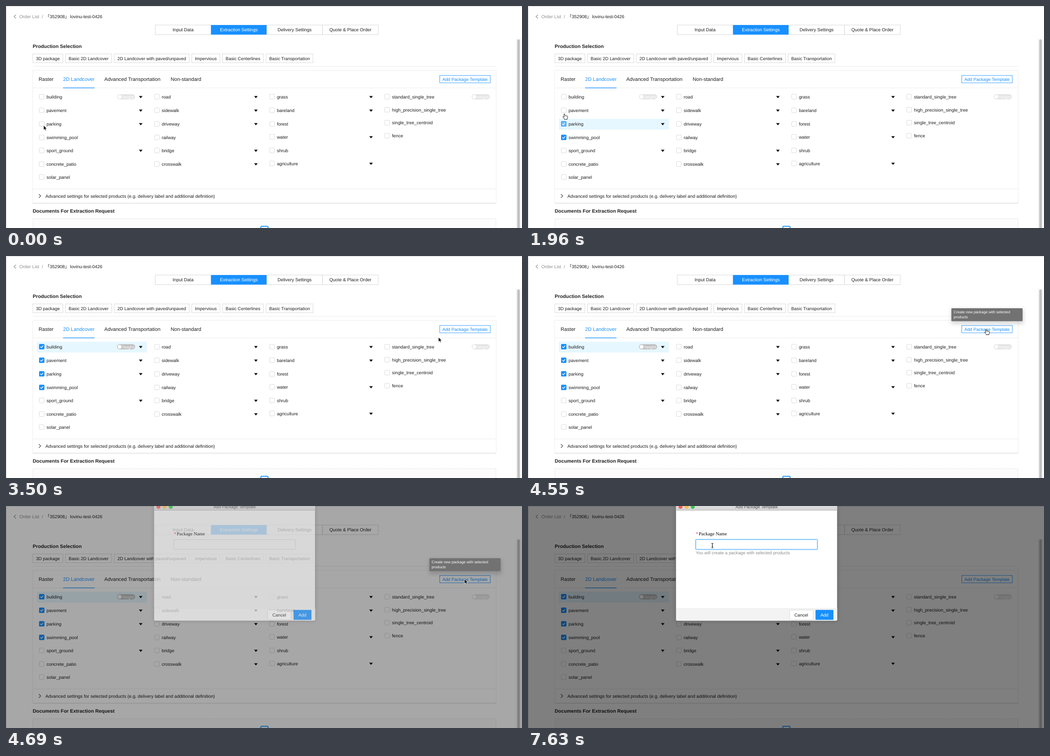
An HTML page for the animation above (8 s loop, 1139 by 492 pixels).

```html
<!DOCTYPE html>
<html lang="en">
<head>
<meta charset="utf-8">
<title>Extraction settings</title>
<style>
html, body { margin: 0; width: 100%; height: 100%; overflow: hidden; background: #fff; }
svg { display: block; width: 1139px; height: 492px; }
text { font: 10px "Liberation Sans", "Noto Sans CJK SC", "Noto Sans CJK JP", "Noto Sans CJK", sans-serif; fill: #1f1f1f; text-rendering: geometricPrecision; }
.mid { text-anchor: middle; }
.head { font-size: 10.8px; font-weight: bold; }
.tab { font-size: 11.15px; }
.pack { font-size: 9.83px; }
.blue { fill: #1890ff; }
.grey { fill: #8c8c8c; }
.white { fill: #fff; }
.line { fill: none; stroke: #d4d4d4; stroke-width: .9; }
.soft { fill: none; stroke: #ececec; }
.hot { stroke: #1890ff; }
.tip { font-size: 8.2px; fill: #fff; }
.small { font-size: 9.7px; }
.label { font: 10.4px "Liberation Serif", serif; fill: #000; }
.chevron { fill: none; stroke: #444; stroke-width: 1.1; }
</style>
</head>
<body>
<svg viewBox="0 0 1139 492">
  <defs>
    <linearGradient id="bar" x2="0" y2="1"><stop stop-color="#e6e6e6"/><stop offset="1" stop-color="#d4d4d4"/></linearGradient>
    <filter id="blur" x="-20%" y="-40%" width="140%" height="180%"><feGaussianBlur stdDeviation="4"/></filter>
  </defs>

  <g id="page">
    <rect width="1139" height="492" fill="#fff"/>
    <path d="M.5 492V3Q.5.5 3 .5H1139" fill="none" stroke="#cfcfcf"/>
    <path class="chevron" d="M22 19.5L17.5 23.5L22 27.5" style="stroke:#8c8c8c"/>
    <text class="grey" x="29.5" y="27">Order List</text>
    <text class="grey" x="79" y="27">/</text>
    <text x="86.5" y="27">「352908」</text>
    <text x="141.5" y="27">lovinu-test-0426</text>
    <g id="steps"></g>
    <text class="head" x="59" y="93">Production Selection</text>
    <g id="packs"></g>
    <path class="soft" d="M59 133.5H1082"/>
    <rect class="soft" x="59" y="142.5" width="1023" height="294.5" rx="1"/>
    <path class="line" d="M59 437H1082"/>
    <path class="soft" d="M59 181.5H1082M59 405.5H1082"/>
    <text class="tab" x="72" y="166.3">Raster</text>
    <text class="tab blue" x="126" y="166.3">2D Landcover</text>
    <text class="tab" x="217" y="166.3">Advanced Transportation</text>
    <text class="tab" x="363.5" y="166.3">Non-standard</text>
    <rect class="blue" x="126" y="180.8" width="69.3" height="1.4"/>
    <rect class="line hot" x="957.4" y="154" width="111.6" height="16.2"/>
    <text class="blue mid" x="1013.2" y="165.8" style="font-size:9.75px">Add Package Template</text>
    <g id="rows"></g>
    <path class="chevron" d="M72.5 417L76.8 421L72.5 425"/>
    <text x="87" y="424.7" style="font-size:10.05px">Advanced settings for selected products (e.g. delivery label and additional definition)</text>
    <text class="head" x="59" y="458.3">Documents For Extraction Request</text>
    <rect x="59.5" y="471.5" width="1022" height="30" fill="#fcfcfc" stroke="#d9d9d9" stroke-dasharray="2 2"/>
    <path d="M561 494L563.5 488.3H577.5L580 494" fill="none" stroke="#40a9ff" stroke-width="2.4"/>
    <rect x="1126.5" y="72" width="12.5" height="420" fill="#fafafa"/>
    <path class="soft" d="M1126.5 72V492"/>
    <rect x="1128.5" y="74" width="5.8" height="430" rx="2.9" fill="#c1c1c1"/>
  </g>

  <rect id="mask" width="1139" height="492" opacity="0"/>

  <g id="tooltip" opacity="0">
    <rect x="934" y="118" width="160" height="33" fill-opacity=".14" filter="url(#blur)"/>
    <rect x="934.5" y="115.7" width="157.3" height="28.8" rx="1.5" fill="#727272"/>
    <text class="tip" x="939.5" y="127">Create new package with selected</text>
    <text class="tip" x="939.5" y="138.3">products</text>
  </g>

  <g id="dialog" opacity="0">
    <rect x="326" y="-10" width="357" height="265" rx="4" fill-opacity=".2" filter="url(#blur)"/>
    <rect id="sheet" x="326.5" y="-10" width="356" height="264.5" rx="3.5" fill="#fff" stroke="#8a8a8a" stroke-width=".7"/>
    <path d="M327 227H682.5V251Q682.5 254 679.5 254H330Q327 254 327 251Z" fill="#f3f3f3"/>
    <path class="soft" d="M327 226.8H682.5"/>
    <rect x="326.8" y="-10" width="355.6" height="19.5" fill="url(#bar)"/>
    <path d="M327 9.5H682.5" stroke="#b4b4b4"/>
    <g id="lights"></g>
    <text class="mid" x="504.7" y="5" style="font-size:9.1px;fill:#4a4a4a">Add Package Template</text>
    <text class="label" x="370.5" y="65.2" style="fill:#f5222d">*</text>
    <text class="label" x="377" y="65">Package Name</text>
    <rect id="glow" x="369.5" y="73.5" width="270" height="23.5" rx="2" fill="none" stroke="#1890ff" stroke-opacity=".22" stroke-width="2" opacity="0"/>
    <rect id="field" x="370.5" y="74.5" width="268" height="21.5" rx="1" fill="none" stroke="#d0d0d0"/>
    <rect id="caret" x="378" y="79" width="1" height="12" opacity="0"/>
    <text id="hint" class="grey small" x="370.3" y="107.3">You will create a package with selected products</text>
    <rect x="577.5" y="230.5" width="52" height="21.5" rx="1" fill="#fff" stroke="#d9d9d9"/>
    <text class="mid small" x="603.2" y="244.6">Cancel</text>
    <rect class="blue" x="634.7" y="230.2" width="39.5" height="22" rx="1"/>
    <text class="mid white" x="654.3" y="244.6">Add</text>
  </g>

  <g id="cursor">
    <path id="arrow" d="M0 0V10.3L2.4 8.1L4 11.7L5.8 10.9L4.2 7.4H7.4Z" fill="#000" stroke="#fff" stroke-width=".8"/>
    <path id="hand" d="M-2 1.2Q-1.1-.4 0 1L1.2 4.6Q2.2 3.6 3.1 4.8Q4.2 3.9 4.9 5.1Q6.4 4.7 6.5 6.4Q6.9 9 5.4 11V12.5H-.7V11.2L-3.9 7.7Q-4.3 6.3-2.8 6.4L-.9 7.3Z" fill="#fff" stroke="#000" stroke-width=".9" stroke-linejoin="round"/>
    <path id="beam" d="M-2.3-4.8Q0-4.8 0-3.6Q0-4.8 2.3-4.8M0-3.8V4.2M-2.3 5.2Q0 5.2 0 4Q0 5.2 2.3 5.2M-1.2 1.7H1.2" fill="none" stroke="#000" stroke-width="1.1"/>
  </g>
</svg>
<script>
const LOOP = 8000;
const byId = id => document.getElementById(id);
const put = (id, html) => byId(id).innerHTML += html;
const rect = (x, y, w, h, attrs) => `<rect x="${x}" y="${y}" width="${w}" height="${h}" ${attrs}/>`;
const text = (x, y, s, cls = '') => `<text x="${x}" y="${y}" class="${cls}">${s}</text>`;

['Input Data', 'Extraction Settings', 'Delivery Settings', 'Quote &amp; Place Order'].forEach((s, i) => {
  const x = 329.4 + i * 123.1, on = i === 1;
  put('steps', rect(x, 42.1, 123.1, 21.4, `class="${on ? 'blue' : 'line'}"`) +
    text(x + 61.5, 56.4, s, on ? 'mid white' : 'mid'));
});

// Package buttons flow left to right, sized by their text
let left = 59.2;
['3D package', 'Basic 2D Landcover', '2D Landcover with paved/unpaved',
 'Impervious', 'Basic Centerlines', 'Basic Transportation'].forEach(s => {
  put('packs', text(left + 7, 119.6, s, 'pack'));
  const w = byId('packs').lastChild.getComputedTextLength() + 14;
  put('packs', rect(left, 106.2, w, 19.5, 'class="line"'));
  left += w + 5.7;
});

['#fc5753', '#fdbc40', '#33c748'].forEach((c, i) =>
  put('lights', `<circle cx="${336.6 + i * 13.5}" cy="1.8" r="4.4" fill="${c}"/>`));

// Products: "v" has a dropdown, "h" a height switch
const columns = [
  'building:vh pavement:v parking:v swimming_pool sport_ground:v concrete_patio solar_panel',
  'road:v sidewalk:v driveway:v railway bridge:v crosswalk:v',
  'grass:v bareland:v forest water:v shrub agriculture:v',
  'standard_single_tree:h high_precision_single_tree single_tree_centroid fence'
];
// Product, hover time, click time
const picks = [
  ['swimming_pool', 280, 1190], ['parking', 1330, 1750], ['pavement', 2030, 2310], ['building', 2380, 3080]
];
const rowY = {};

const pill = (x, y, id) => rect(x, y - 5.7, 40, 11.4, `rx="5.7" fill="#e4e4e4" id="${id}"`) +
  `<circle cx="${x + 5.8}" cy="${y}" r="4.3" fill="#fff"/>
   <text x="${x + 12}" y="${y + 3.3}" class="white" style="font-size:9.4px">height</text>`;

columns.forEach((list, c) => {
  const x = 73 + c * 254.2;
  let y = 201.2;
  list.split(' ').forEach(item => {
    const [name, flags = ''] = item.split(':');
    const drop = flags.includes('v'), h = drop ? 24 : 22.6, pick = picks.some(p => p[0] === name);
    const box = attrs => rect(x + .5, y - 5.5, 10.6, 10.6, `rx="1" ${attrs}`);
    let s = pick ? rect(68, y + .6 - h / 2, 243, h, `id="${name}-row" fill="none"`) : '';
    s += box('fill="#fff" stroke="#d9d9d9"');
    if (pick) s += box(`id="${name}-edge" fill="none" stroke="#1890ff" opacity="0"`) +
      `<g id="${name}-check" opacity="0">${box('class="blue" stroke="#1890ff"')}
       <path d="M${x + 2.8} ${y - .3}l2.3 2.4l4-4.6" fill="none" stroke="#fff" stroke-width="1.4"/></g>`;
    s += text(x + 16.5, y + 3.6, name);
    if (drop) s += `<path d="M${x + 220.4} ${y - 1.8}h8l-4 5z" fill="#111"/>`;
    if (flags.includes('h')) s += pill(drop ? 245 : 1028, y, name + '-pill');
    put('rows', s);
    rowY[name] = y;
    y += drop ? 30.1 : 28.8;
  });
});

// Motion: [ms, value] pairs become CSS keyframes
const motion = document.createElement('style');
document.head.append(motion);
function move(id, prop, keys, ease = 'linear') {
  const all = [[0, keys[0][1]], ...keys, [LOOP, keys.at(-1)[1]]];
  const name = `${id}-${prop}`;
  motion.textContent += `@keyframes ${name} {` +
    all.map(([ms, v]) => `${ms / LOOP * 100}% { ${prop}: ${v} }`).join(' ') +
    `}\n#${id} { animation: ${name} ${LOOP}ms ${ease} infinite }\n`;
}
const fade = (id, start, length, ease, prop = 'opacity', from = 0, to = 1) =>
  move(id, prop, [[start, from], [start + length, to]], ease);
// Shows a part in hard on/off spans: switch times, starting with "on"
const flash = (id, ...times) =>
  move(id, 'opacity', [[0, 0], ...times.map((ms, i) => [ms, (i + 1) % 2])], 'step-end');

const NONE = 'rgba(225,225,225,0)', HOVER = 'rgb(225,225,225)', CHOSEN = 'rgb(230,247,255)';
const stops = [{ from: 0, to: 0, x: 83, y: 264.5 }];
picks.forEach(([name, hover, click], i) => {
  const fill = [[hover, NONE], [hover + 140, HOVER], [click, HOVER], [click + 70, CHOSEN]];
  const next = picks[i + 1];
  if (next) fill.push([next[2], CHOSEN], [next[2] + 70, NONE]);
  move(name + '-row', 'fill', fill);
  fade(name + '-edge', hover, 140);
  fade(name + '-check', click, 280, 'ease-in');
  stops.push({ from: hover + 140, to: click, x: 81, y: rowY[name] - 7.5 });
});
fade('building-pill', 3080, 140, 'linear', 'fill', '#e4e4e4', '#bfbfbf');

stops.push(
  { from: 3640, to: 3780, x: 1082, y: 178 },
  { from: 4340, to: 4690, x: 1012, y: 162 },
  { from: 5250, to: 5320, x: 328, y: 34 },
  { from: 5530, to: 5670, x: 402.5, y: 69.5 },
  { from: 6300, to: LOOP, x: 407, y: 87.5 }
);
const at = p => `translate(${p.x}px, ${p.y}px)`;
move('cursor', 'transform', stops.flatMap(p => [[p.from, at(p)], [p.to, at(p)]]), 'ease-in-out');
flash('arrow', 0, 140, 3220, 4270, 4620, 5880);
flash('hand', 140, 3220, 4270, 4620);
flash('beam', 5880);

move('tooltip', 'opacity', [[4270, 0], [4480, 1], [4760, 1], [4970, 0]]);
fade('mask', 4550, 350, 'ease', 'opacity', 0, .5);
fade('dialog', 4550, 350, 'ease');
fade('sheet', 4690, 210, 'linear', 'fill', '#efefef', '#fff');
fade('hint', 4690, 210);
fade('field', 6020, 210, 'linear', 'stroke', '#d0d0d0', '#40a9ff');
fade('glow', 6020, 210);
flash('caret', ...[0, 1, 2, 3].map(k => 6160 + 490 * k));
</script>
</body>
</html>
```
